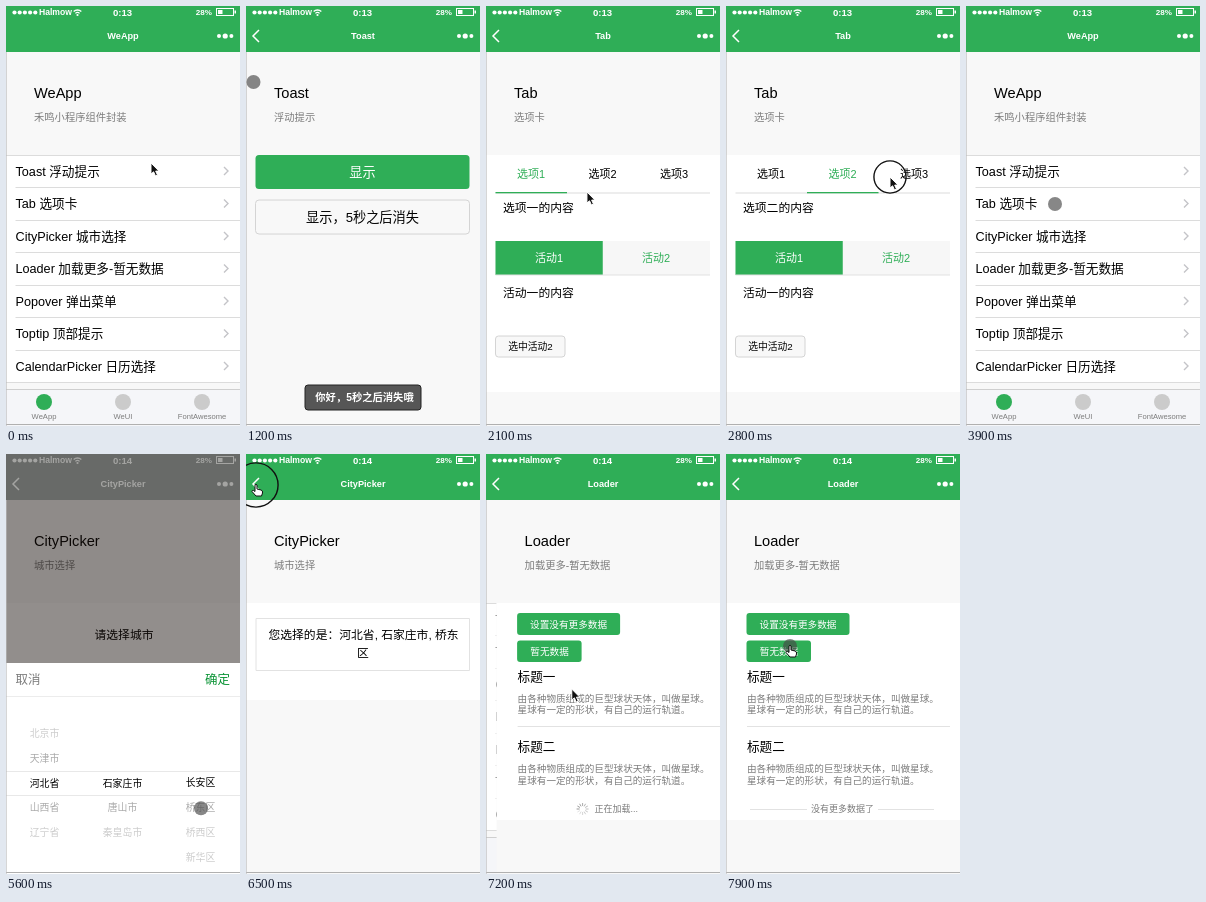
An HTML page with a canvas for the animation above (8 s loop, 234 by 420 pixels).

```html
<!DOCTYPE html>
<html lang="zh-CN">
<head>
<meta charset="utf-8">
<title>WeApp</title>
<style>
html, body { margin: 0; width: 234px; height: 420px; overflow: hidden; background: #f8f8f8 }
canvas { display: block }
</style>
</head>
<body>
<canvas id="stage" width="234" height="420"></canvas>
<script>
const c = document.getElementById('stage').getContext('2d');
const W = 234, LOOP = 8000;
const GREEN = '#2fae57', PALE = '#f8f8f8', LINE = '#dcdcdc', GREY = '#7c7c7c';
const FONT = '"Liberation Sans", "Noto Sans CJK SC", "Noto Sans CJK", sans-serif';

const clamp = v => Math.max(0, Math.min(1, v));
const ease = v => 1 - (1 - clamp(v)) ** 2.2;
const ramp = (t, from, ms) => ease((t - from) / ms);

// Vertical position y is the middle of the glyphs.
function text(s, x, y, size, color = '#111', align = 'left', weight = '') {
  c.font = `${weight} ${size}px ${FONT}`;
  c.textAlign = align;
  c.fillStyle = color;
  c.fillText(s, x, y + size * .37);
}
function rect(x, y, w, h, color) {
  c.fillStyle = color;
  c.fillRect(x, y, w, h);
}
function box(x, y, w, h, r, fill, edge) {
  c.beginPath();
  c.roundRect(x, y, w, h, r);
  c.fillStyle = fill;
  c.fill();
  if (edge) { c.strokeStyle = edge; c.lineWidth = 1; c.stroke(); }
}
function dot(x, y, r, color) {
  c.beginPath();
  c.arc(x, y, r, 0, 7);
  c.fillStyle = color;
  c.fill();
}
function path(points, color, width) {
  c.beginPath();
  points.forEach(p => c.lineTo(...p));
  c.strokeStyle = color;
  c.lineWidth = width;
  c.stroke();
}

function hero(title, sub) {
  rect(0, 46, W, 374, PALE);
  text(title, 28, 87, 14.6, '#000');
  text(sub, 28, 111, 10.3, GREY);
}

const rows = ['Toast 浮动提示', 'Tab 选项卡', 'CityPicker 城市选择', 'Loader 加载更多-暂无数据',
  'Popover 弹出菜单', 'Toptip 顶部提示', 'CalendarPicker 日历选择'];

const pages = {
  WeApp() {
    hero('WeApp', '禾鸣小程序组件封装');
    rect(0, 149, W, 228, '#fff');
    rect(0, 149, W, 1, LINE);
    rows.forEach((row, i) => {
      const y = 165 + i * 32.5;
      text(row, 9.5, y, 12.65, '#000');
      path([[218, y - 4], [222, y], [218, y + 4]], '#c4c4c8', 1.4);
      const left = i < 6 ? 9.5 : 0;
      rect(left, Math.round(y + 16), W - left, 1, LINE);
    });
    rect(0, 383, W, 37, '#f5f6f9');
    rect(0, 383, W, 1, '#cfcfcf');
    ['WeApp', 'WeUI', 'FontAwesome'].forEach((label, i) => {
      const x = 38 + i * 79;
      dot(x, 396, 8, i ? '#cbcbcb' : GREEN);
      text(label, x, 410.5, 7.6, GREY, 'center');
    });
  },
  Toast(t) {
    hero('Toast', '浮动提示');
    box(9.5, 149, 214, 34, 3.5, GREEN);
    text('显示', 116.5, 166, 13.2, '#fff', 'center');
    box(9.5, 194, 214, 34, 3.5, PALE, '#d4d4d4');
    text('显示，5秒之后消失', 116.5, 211, 13.2, '#000', 'center');
    if (t > 850) {
      box(59, 379, 116, 25, 3, '#565656', '#222');
      text('你好，5秒之后消失哦', 118.5, 391.5, 10.3, '#fff', 'center', 'bold');
    }
  },
  Tab(t) {
    hero('Tab', '选项卡');
    rect(0, 149, W, 237, '#fff');
    const tab = t < 2350 ? 0 : t < 2950 ? 1 : 2;
    const act = t < 3300 ? 0 : 1;
    rect(9.5, 186.5, 214.5, 1, LINE);
    rect(9.5 + 71.5 * tab, 186, 71.5, 1.3, GREEN);
    for (let i = 0; i < 3; i++)
      text('选项' + (i + 1), 45 + 71.5 * i, 168, 11, i == tab ? GREEN : '#000', 'center');
    text(`选项${'一二三'[tab]}的内容`, 17, 202, 11.8, '#000');
    rect(9.5, 235, 214.5, 34, '#f7f7f7');
    rect(9.5 + 107.25 * act, 235, 107.25, 34, GREEN);
    rect(9.5, 268.5, 214.5, 1, '#e2e2e2');
    for (let i = 0; i < 2; i++)
      text('活动' + (i + 1), 63 + 107 * i, 251.5, 11, i == act ? '#fff' : GREEN, 'center', '500');
    text(`活动${'一二'[act]}的内容`, 17, 287, 11.8, '#000');
    box(9.5, 330, 69.5, 21, 3, PALE, '#d4d4d4');
    text('选中活动2', 44.5, 340.5, 9.8, '#000', 'center');
  },
  CityPicker(t) {
    hero('CityPicker', '城市选择');
    const done = t > 6050;
    rect(0, 149, W, done ? 97 : 82, '#fff');
    if (done) {
      box(10, 164.5, 213.5, 52, 0, '#fff', '#e2e2e2');
      text('您选择的是：河北省, 石家庄市, 桥东', 117.5, 181, 11.8, '#000', 'center');
      text('区', 117, 199, 11.8, '#000', 'center');
    } else text('请选择城市', 118, 181, 11.8, '#000', 'center');
  },
  Loader(t) {
    hero('Loader', '加载更多-暂无数据');
    rect(0, 149, W, 217, '#fff');
    box(20.5, 159, 103, 22, 3, GREEN);
    text('设置没有更多数据', 72, 170, 9.65, '#fff', 'center');
    box(20.5, 186.5, 64.5, 21.5, 3, GREEN);
    text('暂无数据', 53, 197, 9.65, '#fff', 'center');
    ['一', '二'].forEach((n, i) => {
      const y = 222 + i * 70.5;
      text('标题' + n, 21, y, 12.6, '#000');
      text('由各种物质组成的巨型球状天体，叫做星球。', 21, y + 22, 9.6, GREY);
      text('星球有一定的形状，有自己的运行轨道。', 21, y + 33.5, 9.6, GREY);
    });
    rect(21, 272, 203, 1, '#e2e2e2');
    if (t > 7550) {
      rect(24, 355, 57, 1, '#e2e2e2');
      rect(152, 355, 56, 1, '#e2e2e2');
      text('没有更多数据了', 116.5, 355, 9, GREY, 'center');
    } else {
      for (let i = 0; i < 12; i++) {
        const a = i * Math.PI / 6, shade = 150 + (i + 12 - Math.floor(t / 80) % 12) % 12 * 7;
        path([3, 6].map(r => [86 + r * Math.cos(a), 355 + r * Math.sin(a)]), `rgb(${shade},${shade},${shade})`, 1);
      }
      text('正在加载...', 98, 355, 9, GREY);
    }
  }
};

const visits = [[0, 'WeApp'], [350, 'Toast'], [1400, 'WeApp'], [1850, 'Tab'], [3650, 'WeApp'],
  [4250, 'CityPicker'], [6600, 'WeApp'], [7050, 'Loader']];

function header(title, t, dim) {
  const ink = dim > .5 ? '#a4a4a2' : '#fff';
  rect(0, 0, W, 46, GREEN);
  c.globalAlpha = dim;
  rect(0, 0, W, 46, '#686a68');
  c.globalAlpha = 1;
  for (let i = 0; i < 5; i++) dot(8.5 + i * 5.2, 6.5, 2.1, ink);
  text('Halmow', 33, 6.2, 8.6, ink, 'left', 'bold');
  c.strokeStyle = ink;
  c.lineWidth = 1.3;
  for (const r of [3, 5.5]) {
    c.beginPath();
    c.arc(71.5, 9.5, r, -2.35, -.8);
    c.stroke();
  }
  dot(71.5, 9, 1.1, ink);
  text(t < 5400 ? '0:13' : '0:14', 116.5, 6.2, 9.6, ink, 'center', 'bold');
  text('28%', 206, 6.2, 8.1, ink, 'right', 'bold');
  c.strokeStyle = ink;
  c.lineWidth = 1;
  c.strokeRect(210.5, 2.5, 17, 7);
  rect(212, 4, 4.5, 4, ink);
  rect(228.5, 4.5, 1.5, 3, ink);
  text(title, 117, 29.7, 9.2, ink, 'center', 'bold');
  if (title != 'WeApp') path([[13, 24], [7, 30], [13, 36]], ink, 1.5);
  [2, 2.6, 2].forEach((r, i) => dot(213 + i * 6.2, 30, r, ink));
}

function picker(t, open) {
  const top = 416 - 207 * open, mid = top + 120;
  rect(0, top, W, 420 - top, '#fff');
  text('取消', 9.5, top + 16.5, 12.5, GREY);
  text('确定', 224, top + 16.5, 12.5, '#0b9436', 'right', '500');
  rect(0, top + 33, W, 1, '#ececec');
  rect(0, mid - 12, W, 1, '#e8e8e8');
  rect(0, mid + 12, W, 1, '#e8e8e8');
  const hebei = t > 5350;
  const columns = [
    [['北京市', '天津市', '河北省', '山西省', '辽宁省'], 2 * ramp(t, 5000, 350)],
    [hebei ? ['石家庄市', '唐山市', '秦皇岛市'] : ['北京市', '县'], 0],
    [hebei ? ['长安区', '桥东区', '桥西区', '新华区'] : ['东城区', '西城区', '崇文区', '宣武区'], ramp(t, 5600, 250)]
  ];
  c.save();
  c.beginPath();
  c.rect(0, top + 34, W, 174);
  c.clip();
  columns.forEach(([names, at], i) => names.forEach((name, k) => {
    const gap = Math.abs(k - at);
    text(name, 38.5 + 78 * i, mid + (k - at) * 24.8, 9.9, gap < .5 ? '#000' : gap < 1.5 ? '#aaa' : '#ccc', 'center');
  }));
  c.restore();
}

// time, x, y, pointer shape until the next stop
const stops = [[0, 145, 157, 'arrow'], [200, 100, 166, 'dot'], [500, 100, 170, 'dot'], [750, 116, 211, 'dot'],
  [900, 100, 205, 'dot'], [1200, 7.5, 76, 'dot'], [1300, 10, 31, 'hand'], [1450, 14, 40, 'dot'],
  [1700, 89, 198, 'dot'], [2000, 92, 196, 'arrow'], [2250, 117, 168, 'arrow'], [2650, 130, 170, 'arrow'],
  [2800, 164, 171, 'arrow'], [2900, 186, 168, 'arrow'], [3050, 176, 252, 'dot'], [3200, 50, 337, 'dot'],
  [3350, 48, 336, 'dot'], [3550, 10, 31, 'hand'], [3700, 14, 45, 'dot'], [3900, 89, 198, 'dot'],
  [4150, 96, 230, 'dot'], [4350, 100, 226, 'arrow'], [4550, 109, 185, 'arrow'], [4800, 109, 185, 'arrow'],
  [5000, 42, 365, 'dot'], [5300, 42, 300, 'dot'], [5580, 195, 355, 'dot'], [5800, 195, 325, 'dot'],
  [6000, 212, 226, 'dot'], [6100, 205, 215, 'arrow'], [6320, 10, 31, 'hand'], [6600, 10, 31, 'dot'],
  [6900, 92, 262, 'dot'], [7100, 90, 258, 'arrow'], [7400, 74, 171, 'dot'], [7600, 72, 173, 'dot'],
  [7850, 64, 192, 'hand'], [8000, 64, 192, 'hand']];
const clicks = [230, 760, 1300, 1700, 2260, 2700, 3200, 3500, 4150, 4580, 5990, 6325, 6930, 7480];
const shapes = {
  arrow: new Path2D('M0 0V11L2.6 8.8L4.5 13L6.5 12.1L4.7 8.1H8Z'),
  hand: new Path2D('M-1 0Q0-1.5 1 0V4L5 5Q7 5.5 6.5 8L5.5 11H0L-4 6.5Q-4 5-2.5 5.5L-1 6.5Z')
};

function pointer(t) {
  const i = stops.findIndex((s, k) => k + 1 == stops.length || t < stops[k + 1][0]);
  const a = stops[i], b = stops[i + 1] || a;
  const p = clamp((t - a[0]) / (b[0] - a[0] || 1)), k = p * p * (3 - 2 * p);
  const x = a[1] + (b[1] - a[1]) * k, y = a[2] + (b[2] - a[2]) * k, shape = a[3];
  const click = clicks.find(v => t >= v && t < v + 200);
  if (click !== undefined) {
    c.beginPath();
    c.arc(x, y, 8 + (t - click) * .08, 0, 7);
    c.strokeStyle = '#111';
    c.lineWidth = 1.4;
    c.stroke();
  }
  if (shape == 'dot' || t > 7850) dot(x, y, 7, 'rgba(70,70,70,.65)');
  if (shape == 'dot') return;
  const arrow = shape == 'arrow';
  c.save();
  c.translate(x, y);
  c.lineJoin = 'round';
  c.strokeStyle = arrow ? '#fff' : '#111';
  c.fillStyle = arrow ? '#111' : '#fff';
  c.lineWidth = 1;
  c.fill(shapes[shape]);
  c.stroke(shapes[shape]);
  c.restore();
}

function drawPage(name, t, x) {
  c.save();
  c.translate(x, 0);
  pages[name](t);
  c.restore();
}

function draw(t) {
  let i = visits.length - 1;
  while (visits[i][0] > t) i--;
  const [since, name] = visits[i], move = i ? ramp(t, since, 200) : 1;
  const before = i ? visits[i - 1][1] : name;
  if (move >= 1) drawPage(name, t, 0);
  else if (name == 'WeApp') {
    drawPage(name, t, 0);
    drawPage(before, since, W * move);
  } else {
    drawPage(before, t, 0);
    drawPage(name, t, W * (1 - move));
  }
  const open = ramp(t, 4645, 340) * (1 - ramp(t, 6040, 200));
  const dim = clamp((t - 4640) / 120) * (1 - clamp((t - 6040) / 150));
  if (dim) rect(0, 46, W, 374, `rgba(25,15,11,${.47 * dim})`);
  header(name, t, dim);
  if (open) picker(t, open);
  rect(0, 418, W, 1, '#b0b0b0');
  rect(0, 46, .6, 374, '#bbb');
  pointer(t);
}

const start = performance.now();
function tick() {
  draw((performance.now() - start) % LOOP);
  requestAnimationFrame(tick);
}
tick();
</script>
</body>
</html>
```
